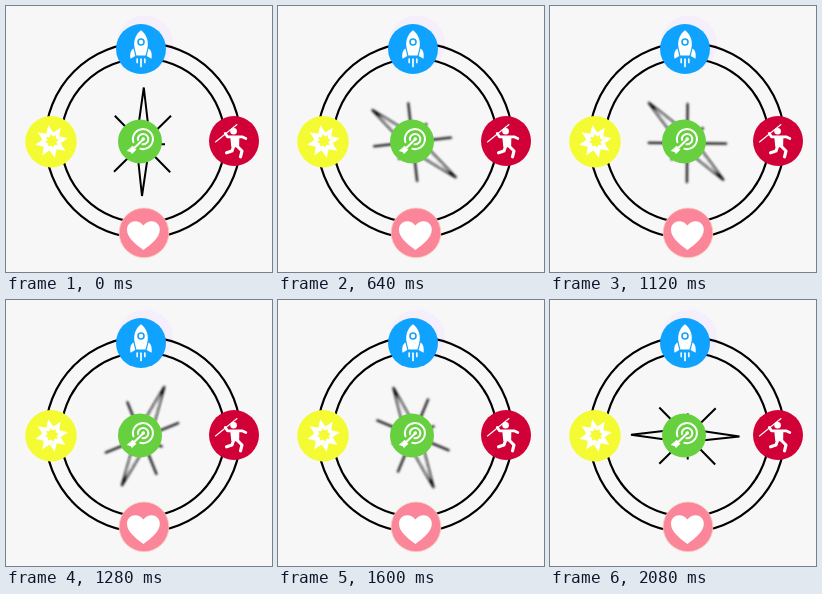
Animation, 266 px wide and 266 px high, one loop 4000 ms. Source, as an HTML page:

```html
<!DOCTYPE html>
<html lang="en">
<head>
<meta charset="utf-8">
<title>Compass</title>
<style>
html, body { margin: 0; width: 100%; height: 100%; overflow: hidden; background: #f7f7f7; }
svg { display: block; width: 100%; height: 100%; }
.line { fill: none; stroke: #000; stroke-width: 2.2; }
.icon { fill: none; stroke: #fff; stroke-linecap: round; stroke-linejoin: round; }
.white { fill: #fff; }
</style>
</head>
<body>
<svg viewBox="0 0 266 266">
  <defs>
    <filter id="soft" filterUnits="userSpaceOnUse" x="66" y="66" width="140" height="140">
      <feGaussianBlur id="blur" stdDeviation="0.8"/>
    </filter>
  </defs>

  <circle cx="139" cy="37.5" r="28" fill="#f4effa"/>
  <g class="line">
    <circle cx="137" cy="134.5" r="97.6"/>
    <circle cx="137" cy="134.5" r="82"/>
  </g>

  <g id="compass">
    <g id="star" class="line" style="stroke-width:2">
      <path d="M108.8 109.8L164.2 166.2M165 109.8L108 165.7M113 138.2H159"/>
      <path d="M137.8 81.5L144 135.5L136 190L130.2 135.5Z" fill="#f7f7f7"/>
    </g>
  </g>

  <!-- target -->
  <circle cx="134" cy="135.5" r="22" fill="#67d03f"/>
  <g class="icon" stroke-width="2">
    <path d="M127.4 136.2A10 10 0 1 1 134.4 142.8"/>
    <path d="M132 134A5.2 5.2 0 1 1 136.5 138.3"/>
    <path d="M137.5 133L126 144.3"/>
    <path class="white" stroke-width="1" d="M127 140.5V143.5H130L126 147.5L124.8 145.6L121.8 144.8Z"/>
  </g>
  <circle class="white" cx="137.3" cy="133" r="1.8"/>

  <!-- rocket -->
  <circle cx="135" cy="43" r="25" fill="#0fa2ff"/>
  <path class="white" d="M135 24.3C140 28 143 34.5 141.4 42L139.6 49.5H130.4L128.6 42C127 34.5 130 28 135 24.3Z"/>
  <path class="white" d="M127.5 42.5L129.3 50L124.5 52.8C123.8 48 124.5 44.5 127.5 42.5ZM142.5 42.5L140.7 50L145.5 52.8C146.2 48 145.5 44.5 142.5 42.5Z"/>
  <circle cx="135" cy="36" r="3" fill="#fff" stroke="#0fa2ff" stroke-width="1.6"/>
  <path class="icon" stroke-width="1.7" d="M131.2 53V56.5M135 53V60.5M138.8 53V56.5"/>

  <!-- burst -->
  <circle cx="45" cy="135.7" r="25.7" fill="#f4fb32"/>
  <path id="burst" class="white"/>
  <path id="core" fill="#f4fb32"/>

  <!-- javelin thrower -->
  <circle cx="228" cy="135" r="25" fill="#d10037"/>
  <path class="icon" stroke-width="1.1" d="M209.5 136L231 118.5"/>
  <circle class="white" cx="227.6" cy="125.2" r="3.3"/>
  <g class="icon">
    <path stroke-width="2.8" d="M219.3 127.5L221.5 130.8H236L239.8 132.5"/>
    <path class="white" stroke-width="1.5" d="M225 130.8H232.6L232.4 140.5H226Z"/>
    <path stroke-width="3.1" d="M227.5 140.5L226 145L220.5 146.8M231.5 140.5L236 145L234.5 150.8"/>
  </g>

  <!-- heart -->
  <circle cx="138" cy="226.8" r="24.8" fill="#fb869a" stroke="#fbc9b9" stroke-width=".8"/>
  <path class="white" d="M137.4 244C130 238.5 121 232 121 223.8C121 214 132.5 212.5 137.4 219.5C142.3 212.5 153.8 214 153.8 223.8C153.8 232 144.8 238.5 137.4 244Z"/>
</svg>
<script>
const LOOP = 4000, STEP = 40, SPIN_END = 2080;
const CENTER = "136 136.5";
// time in ms, angle in degrees, speed in degrees per 320 ms
const KEYS = [
  [0, 0, 14], [320, 40, 65], [640, 128, 108], [1120, 315, 133],
  [1440, 450, 134], [1760, 575, 97], [SPIN_END, 630, 0]
];
const $ = id => document.getElementById(id);

function starPath(cx, cy, outer, inner, points) {
  let d = "";
  for (let i = 0; i < points * 2; i++) {
    const a = Math.PI * (i - 0.5) / points;
    const r = i % 2 ? inner : outer;
    d += `${i ? "L" : "M"}${cx + r * Math.cos(a)} ${cy + r * Math.sin(a)}`;
  }
  return d + "Z";
}

function angleAt(t) {
  if (t >= SPIN_END) return 630;
  const i = KEYS.findIndex(k => k[0] > t) - 1;
  const [t0, a0, v0] = KEYS[i], [t1, a1, v1] = KEYS[i + 1];
  const span = (t1 - t0) / 320, u = (t - t0) / (t1 - t0), w = 1 - u;
  return a0 * w * w * (1 + 2 * u) + a1 * u * u * (3 - 2 * u)
    + span * u * w * (v0 * w - v1 * u);
}

function draw(now) {
  const t = Math.floor((now % LOOP) / STEP) * STEP;
  const softness = 0.8 * Math.max(0, Math.min(1, t / 160, (SPIN_END - t) / 240));
  $("compass").setAttribute("transform", `rotate(${angleAt(t)} ${CENTER})`);
  if (softness > 0) {
    $("blur").setAttribute("stdDeviation", softness);
    $("star").setAttribute("filter", "url(#soft)");
  } else {
    $("star").removeAttribute("filter");
  }
}

$("burst").setAttribute("d", starPath(45.5, 135.5, 16.5, 9.3, 8));
$("core").setAttribute("d", starPath(46, 135, 7, 4.5, 8));

const start = performance.now();
function tick() {
  draw(performance.now() - start);
  requestAnimationFrame(tick);
}
tick();
</script>
</body>
</html>
```
